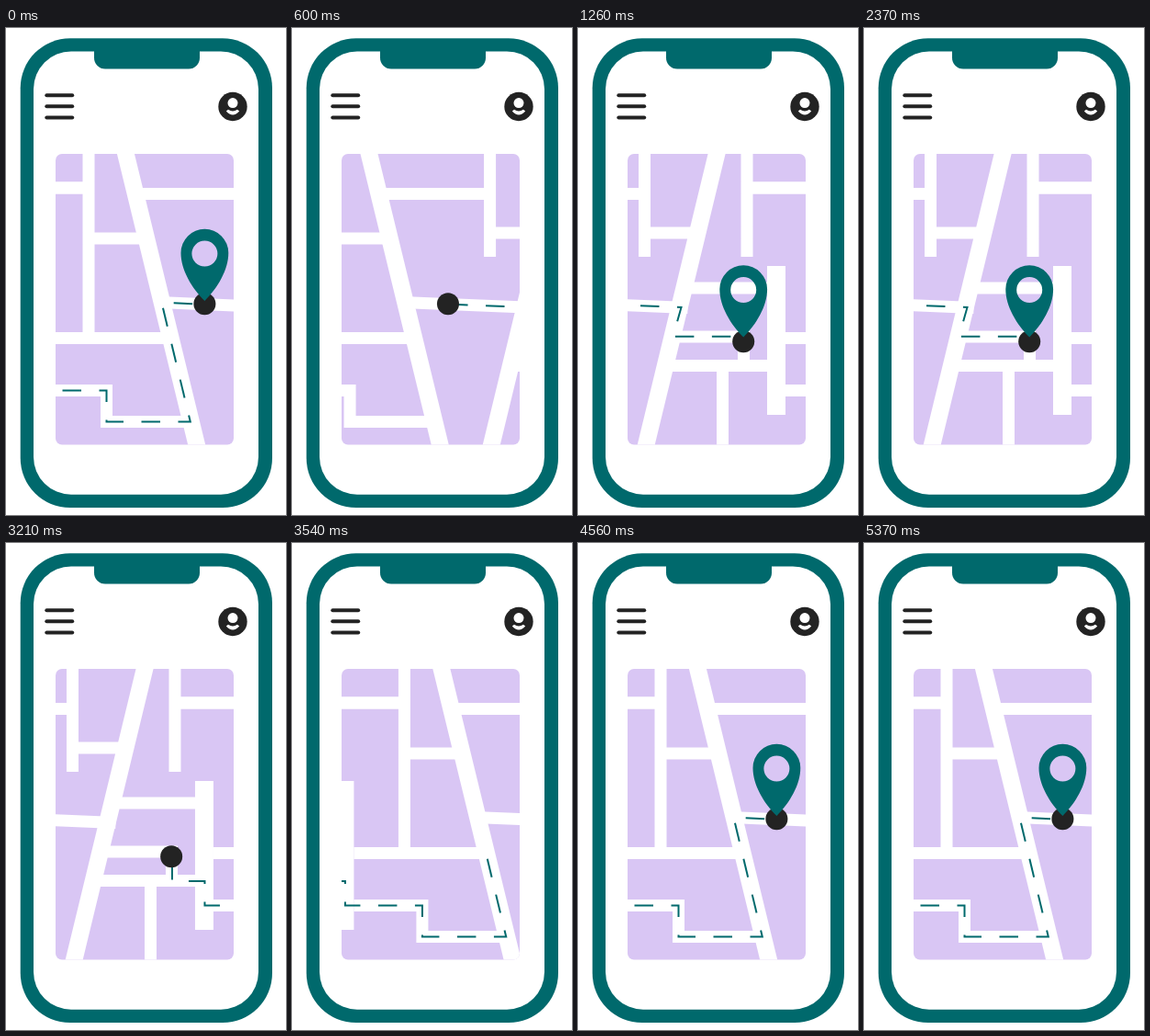
These frames come from a looping animation (305 by 530 pixels, 5400 ms). An HTML page with a canvas:

```html
<!DOCTYPE html>
<html lang="en">
<head>
<meta charset="utf-8">
<title>Map route</title>
<style>
html, body { margin: 0; width: 100%; height: 100%; overflow: hidden; background: #fff; }
canvas { display: block; width: 305px; height: 530px; }
</style>
</head>
<body>
<canvas id="stage" width="305" height="530"></canvas>
<script>
const ctx = document.getElementById('stage').getContext('2d');
const TEAL = '#00696c', INK = '#232323', LILAC = '#d9c6f4', WHITE = '#fff';
const LOOP = 5400, SECOND = 2820;
const SPAN = 380.5, HALF = 189.5; // width of the repeating map, scroll of the first leg
const DASH = 20.5, STEP = 40;

// Centre lines of the roads, by width
const lanes = new Path2D(
  'M90 130V331M-1 174H90M90 229H148M35 337.5H175M35 394.5H109.5V428.5H200' +
  'M140 180.5H262M262 130V249M262 223H315M166 298.5L309 304.4' +
  'M309 283H400M297 336H370V367.5M290 367.5H400M347 367.5V460M373.5 130V249M373.5 174H465');
const avenues = new Path2D('M128 127L210 463M343 127L261.4 463');
const square = new Path2D('M405.5 259V421');

function makeRoute(phase, d) {
  const el = document.createElementNS('http://www.w3.org/2000/svg', 'path');
  el.setAttribute('d', d);
  return { phase, path: new Path2D(d), length: el.getTotalLength() };
}
const routes = [
  makeRoute(1, 'M216.5 300.5L302 304L293 335.8H369.5'),
  makeRoute(5, 'M370.5 341V368H406V394.5H490V428.5H581.3L550 298.7L596.5 301')
];

const first = { x: 216.4, y: 300.3, tip: 297 };
const stops = [first, { x: 369.7, y: 341.3, tip: 336.5 }, { ...first, x: first.x + SPAN }];

const ramp = (t, from, to) => Math.min(1, Math.max(0, (t - from) / (to - from)));
const quartInOut = p => p < 0.5 ? 8 * p ** 4 : 1 - 8 * (1 - p) ** 4;
const backIn = p => 2.70158 * p ** 3 - 1.70158 * p * p;
const backOut = p => 1 - backIn(1 - p);

function box(x, y, w, h, r, color) {
  ctx.fillStyle = color;
  ctx.beginPath();
  ctx.roundRect(x, y, w, h, r);
  ctx.fill();
}

function disc(x, y, r, color) {
  ctx.fillStyle = color;
  ctx.beginPath();
  ctx.arc(x, y, r, 0, Math.PI * 2);
  ctx.fill();
}

function line(path, width, color) {
  ctx.lineWidth = width;
  ctx.strokeStyle = color;
  ctx.stroke(path);
}

const smile = new Path2D('M239.8 90.6L242 88.8Q247 92 252 88.8L254.2 90.6Q247 98.5 239.8 90.6Z');

function drawPhone() {
  box(15.7, 11.3, 274.3, 510.7, 54, TEAL);
  box(30, 25.5, 245, 482.2, 41, WHITE);
  box(96, 20, 115, 24.4, [0, 0, 12, 12], TEAL);
  for (let i = 0; i < 3; i++) box(42.3, 71.2 + 12.1 * i, 31.9, 4, 2, INK);
  disc(247, 85.5, 15.7, INK);
  disc(247, 81.6, 5.5, WHITE);
  ctx.fill(smile);
}

function drawRoads() {
  line(lanes, 13, WHITE);
  line(avenues, 18.5, WHITE);
  line(square, 20, WHITE);
}

// Shows the dashes between the shares tail and head of the route
function drawRoute(route, shift, tail, head) {
  ctx.save();
  ctx.translate(shift, 0);
  for (let d = route.phase; d < route.length; d += STEP) {
    const a = Math.max(d, tail * route.length);
    const b = Math.min(d + DASH, head * route.length);
    if (b <= a) continue;
    ctx.setLineDash([b - a, 9999]);
    ctx.lineDashOffset = -a;
    line(route.path, 2, TEAL);
  }
  ctx.restore();
}

const drop = new Path2D(
  'M0 0C-14 -14 -25.9 -34 -25.9 -52.3A25.9 25.9 0 0 1 25.9 -52.3C25.9 -34 14 -14 0 0Z' +
  'M14 -51.4A14 14 0 0 1 -14 -51.4A14 14 0 0 1 14 -51.4Z');

function drawStop(stop, dotScale, pinScale) {
  if (dotScale > 0) disc(stop.x, stop.y, 12 * dotScale, INK);
  if (pinScale <= 0) return;
  ctx.save();
  ctx.translate(stop.x, stop.tip);
  ctx.scale(pinScale, pinScale);
  ctx.fillStyle = TEAL;
  ctx.fill(drop, 'evenodd');
  ctx.restore();
}

function drawMap(time) {
  const leg = time < SECOND ? 0 : 1;
  const t = time - leg * SECOND;
  const from = leg * HALF, to = leg ? SPAN : HALF;
  const scroll = from + (to - from) * quartInOut(ramp(t, 350, 950));
  const pop = backOut(ramp(t, 930, 1230));

  ctx.save();
  box(54, 137, 194, 316.5, 7, LILAC);
  ctx.clip();
  ctx.translate(-scroll, 0);
  for (let k = -1; k <= 1; k++) {
    ctx.save();
    ctx.translate(k * SPAN, 0);
    drawRoads();
    ctx.restore();
  }
  drawRoute(routes[1 - leg], leg ? 0 : -SPAN, ramp(t, 0, 330), 1);
  drawRoute(routes[leg], 0, 0, ramp(t, 230, 830));
  drawStop(stops[leg], 1, 1 - backIn(ramp(t, 0, 300)));
  drawStop(stops[leg + 1], pop, pop);
  ctx.restore();
}

const origin = performance.now();
function frame(now) {
  ctx.fillStyle = WHITE;
  ctx.fillRect(0, 0, 305, 530);
  drawPhone();
  drawMap(Math.max(0, now - origin) % LOOP);
  requestAnimationFrame(frame);
}
frame(origin);
</script>
</body>
</html>
```
